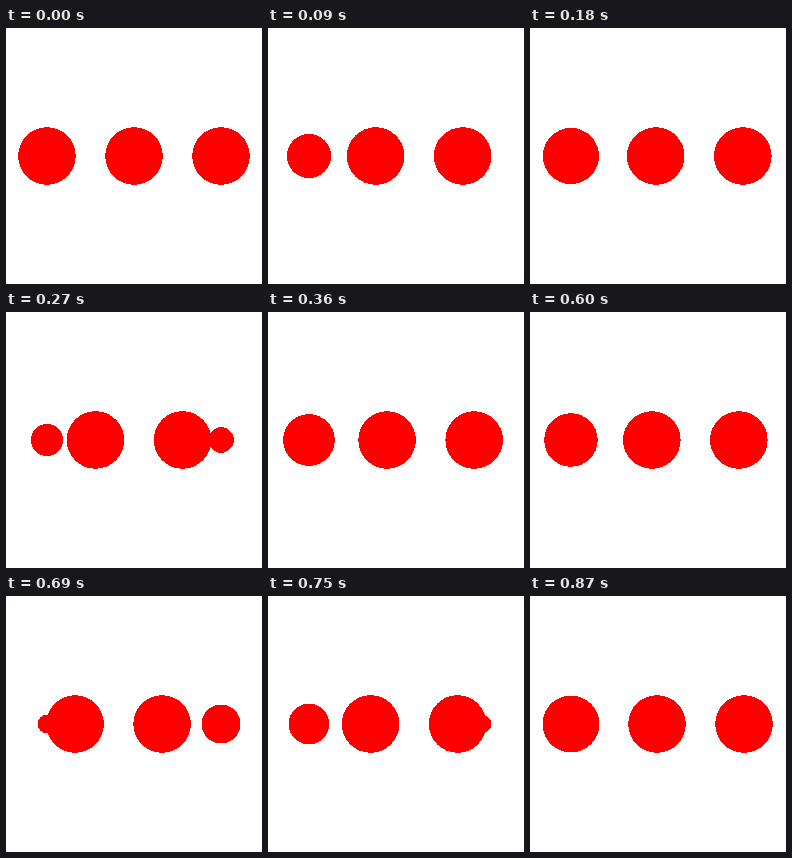
These frames come from a looping animation (256 by 256 pixels, 900 ms). An HTML page:

```html
<!DOCTYPE html>
<html lang="en">
<head>
<meta charset="utf-8">
<title>Loading dots</title>
<style>
  html, body { margin: 0; width: 100%; height: 100%; overflow: hidden; background: #fff; }
  svg { display: block; width: 100%; height: 100%; }
</style>
</head>
<body>
<svg viewBox="0 0 256 256" fill="#f00" shape-rendering="crispEdges">
  <circle cy="128"/>
  <circle cy="128"/>
  <circle cy="128"/>
  <circle cy="128"/>
</svg>
<script>
  const LOOP = 900, STEP = 30, CYCLES = 4;
  const LEFT = 40.96, GAP = 87.04, RADIUS = 28.8;
  const dots = document.querySelectorAll('circle');

  // cubic-bezier(0, 0.5, 0.5, 1)
  function ease(x) {
    let lo = 0, hi = 1;
    for (let i = 0; i < 30; i++) {
      const s = (lo + hi) / 2;
      if (1.5 * s * s - 0.5 * s ** 3 < x) lo = s; else hi = s;
    }
    return 1.5 * lo - 0.5 * lo ** 3;
  }

  function place(dot, slot, size) {
    dot.setAttribute('cx', LEFT + GAP * slot);
    dot.setAttribute('r', RADIUS * size);
  }

  function draw(time) {
    const step = Math.floor((time % LOOP) / STEP);
    const q = ease((step * STEP * CYCLES / LOOP) % 1);
    place(dots[0], 0, q);
    place(dots[1], q, 1);
    place(dots[2], 1 + q, 1);
    place(dots[3], 2, 1 - q);
  }

  let start;
  function tick(now) {
    if (start === undefined) start = now;
    draw(Math.max(0, now - start));
    requestAnimationFrame(tick);
  }
  draw(0);
  requestAnimationFrame(tick);
</script>
</body>
</html>
```
